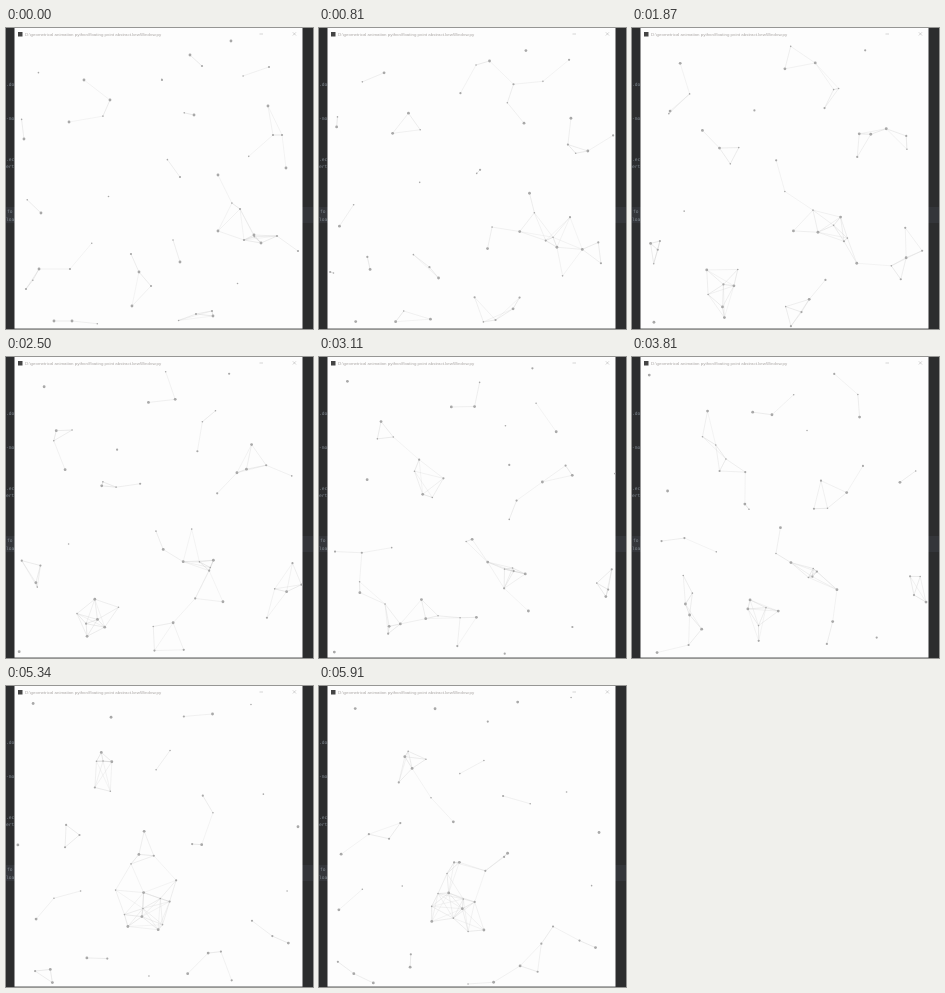
These frames come from a looping animation (307 px wide and 301 px high, 5960 ms). An HTML page with a canvas:

```html
<!DOCTYPE html>
<html lang="en">
<head>
<meta charset="utf-8">
<title>Floating points</title>
<style>
html, body { margin: 0; width: 100%; height: 100%; overflow: hidden; background: #2b2b2b; }
svg, canvas { position: absolute; left: 0; top: 0; width: 307px; height: 301px; }
.title { font: 4.4px "Liberation Sans", sans-serif; fill: #aaa6a4; }
.code { font: 4.6px "DejaVu Sans Mono", monospace; fill: #7f8890; }
</style>
</head>
<body>
<svg viewBox="0 0 307 301">
  <rect width="307" height="301" fill="#2c2d2e"/>
  <rect y="179" width="307" height="16" fill="#34363a"/>
  <g class="code">
    <text x="0" y="58">.do</text>
    <text x="0" y="92">-mo</text>
    <text x="0" y="133">.ec</text>
    <text x="0" y="140">ert</text>
    <text x="1" y="185">fo</text>
    <text x="0" y="193">loa</text>
  </g>
  <rect x="8.5" width="288" height="300.6" fill="#fdfdfd"/>
  <rect x="12" y="4" width="4.5" height="4.5" fill="#444"/>
  <text class="title" x="19" y="7.6">D:\geometrical animation python/floating point abstract.kewWindow.py</text>
  <path d="M253.5 6h3.5M286.8 4.3l3.2 3.2m0-3.2l-3.2 3.2" stroke="#aaa" stroke-width=".5" fill="none"/>
</svg>
<canvas></canvas>
<script>
const LOOP = 5960, REACH = 35, FILLERS = 18;
const LEFT = 10, TOP = 11, WIDTH = 286, HEIGHT = 288;

// Points of one stream share a drift (px per loop)
const streams = [
  { drift: [-107, 97], from: [[104, 72], [156, 52], [35, 185], [125, 226], [126, 278]] },
  { drift: [-74, 90], from: [[262, 78], [292, 223], [248, 207]] },
  { drift: [-133, 70], from: [[225, 13], [267, 107]] },
  { drift: [-95, -53], from: [[78, 52], [174, 149], [207, 288], [263, 39]] },
  { drift: [61, 47], from: [[255, 215], [271, 208]] },
  { drift: [-83, 4], from: [[212, 203], [238, 212], [48, 293]] },
  { drift: [-11, 134], from: [[212, 147], [196, 38]] },
  { drift: [-99, 44], from: [[184, 27], [190, 286], [133, 244]] },
  { drift: [125, 60], from: [[188, 87], [234, 181]] },
  { drift: [133, 3], from: [[33, 241], [276, 107]] },
  { drift: [-82, -125], from: [[280, 140], [20, 261]] },
  { drift: [-115, -89], from: [[18, 111], [64, 241]] },
  { drift: [78, 83], from: [[66, 293], [145, 258], [63, 94]] },
  { drift: [-40, -99], from: [[174, 234], [206, 283]] }
];
const points = streams.flatMap(({ drift: [dx, dy], from }) =>
  from.map(([x, y], i) => ({ x, y, dx, dy, r: i % 2 ? 1.1 : 1.4 })));

// Small fillers, spread evenly over the window
for (let i = 1; i <= FILLERS; i++) {
  points.push({
    x: LEFT + WIDTH * (i * .7549 % 1),
    y: TOP + HEIGHT * (i * .5698 % 1),
    dx: 105 * Math.cos(i * 2.4),
    dy: 105 * Math.sin(i * 2.4),
    r: .8
  });
}

// Reflects a coordinate back and forth between two walls
function bounce(v, low, size) {
  const p = (v - low + 2 * size) % (2 * size);
  return low + Math.min(p, 2 * size - p);
}

const canvas = document.querySelector("canvas");
const ratio = window.devicePixelRatio || 1;
canvas.width = 307 * ratio;
canvas.height = 301 * ratio;
const ctx = canvas.getContext("2d");
ctx.scale(ratio, ratio);
ctx.lineWidth = .5;
ctx.strokeStyle = "#c8c8c8";
ctx.fillStyle = "#a8a8a8";

function link(a, b) {
  const distance = Math.hypot(a.x - b.x, a.y - b.y);
  if (distance > REACH) return;
  ctx.globalAlpha = 1 - .65 * distance / REACH;
  ctx.beginPath();
  ctx.moveTo(a.x, a.y);
  ctx.lineTo(b.x, b.y);
  ctx.stroke();
}

function draw(u) {
  const now = points.map(p => ({
    x: bounce(p.x + p.dx * u, LEFT, WIDTH),
    y: bounce(p.y + p.dy * u, TOP, HEIGHT),
    r: p.r
  }));
  ctx.clearRect(0, 0, 307, 301);
  now.forEach((a, i) => now.slice(i + 1).forEach(b => link(a, b)));
  ctx.globalAlpha = 1;
  for (const p of now) {
    ctx.beginPath();
    ctx.arc(p.x, p.y, p.r, 0, 2 * Math.PI);
    ctx.fill();
  }
}

const start = performance.now();
function tick() {
  draw((performance.now() - start) % LOOP / LOOP);
  requestAnimationFrame(tick);
}
tick();
</script>
</body>
</html>
```
